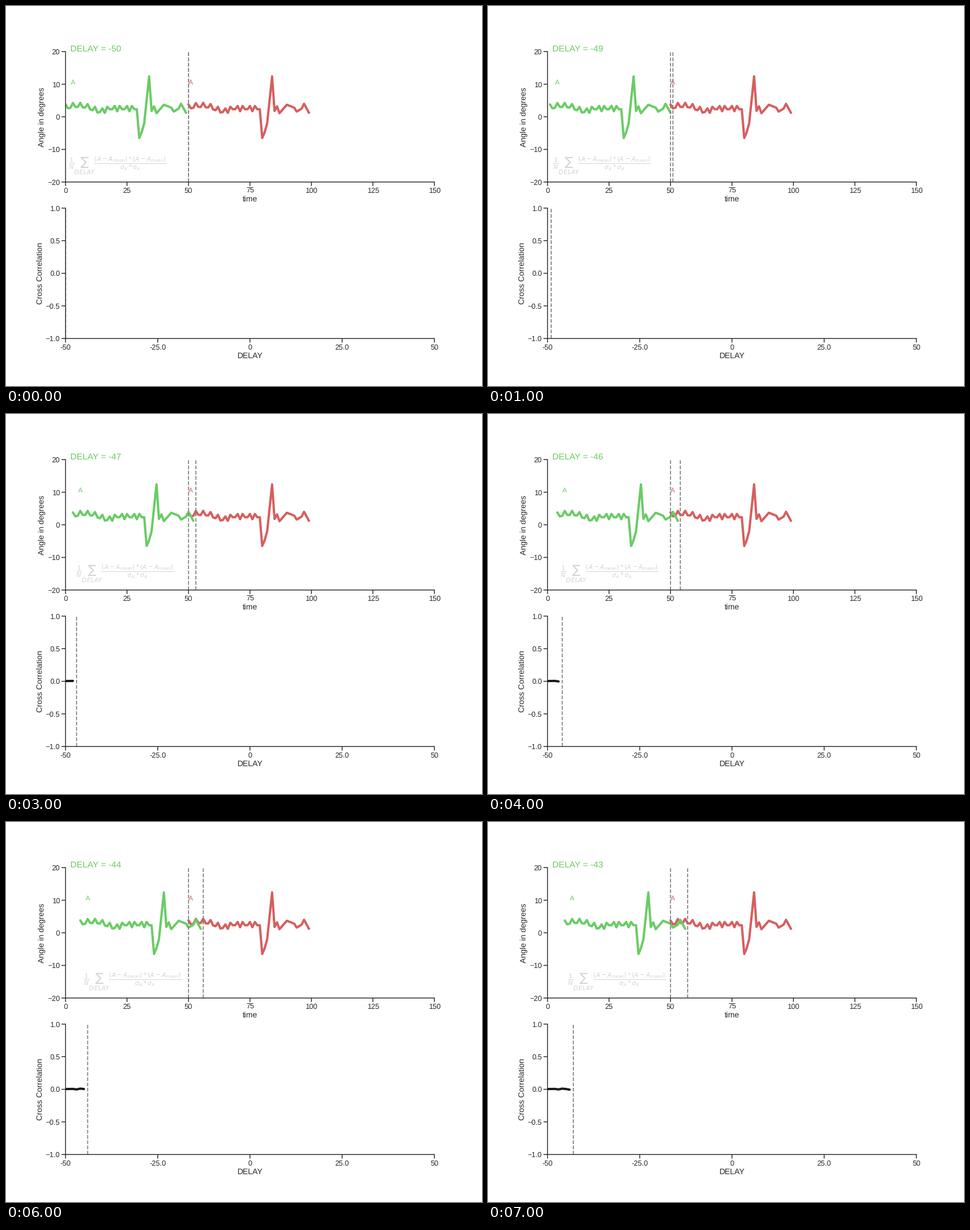
Write a matplotlib script that moves like this. It is 837 px wide and 669 px high and loops after 8000 ms.

```python
import numpy as np
import matplotlib.pyplot as plt
from matplotlib.animation import FuncAnimation

W, H, DPI = 837, 669, 83.7
FRAMES, INTERVAL = 8, 1000
GREEN, RED, INK, BLACK = "#6ACC65", "#D65F5F", "#262626", "#1A1A1A"
SAMPLES = 50
FORMULA = (r"$\frac{1}{N}\sum_{DELAY}"
           r"\frac{(A-A_{mean})*(A-A_{mean})}{\sigma_A*\sigma_A}$")

plt.rcParams.update({
    "font.family": "Liberation Sans",
    "font.size": 12,
    "mathtext.fontset": "dejavusans",
    "text.hinting": "none",
    "text.color": INK,
    "axes.labelcolor": INK,
    "axes.edgecolor": INK,
    "axes.linewidth": 1.25,
    "axes.labelsize": 12,
    "axes.spines.top": False,
    "axes.spines.right": False,
    "lines.solid_capstyle": "round",
})


def angle(t):
    """A drifting ripple, then a sharp dip and spike that settles."""
    cycle = np.interp(t, [0, 12, 14.75, 29.75], [0, 4, 5, 11])
    drift = np.interp(t, [0, 4, 8, 14, 18], [2.9, 3.5, 3.3, 1.6, 2.6])
    ripple = drift + 0.9 * np.cos(2 * np.pi * cycle)
    spike = np.interp(t, [30, 31, 32, 34, 35, 36, 37, 40, 43, 44, 46, 47, 49],
                      [-6.5, -4.7, -2, 12.4, 1.8, 3.2, 1.1, 3.7, 2.8, 1.6,
                       2.5, 4, 1.2])
    return np.where(t < 30, ripple, spike)


def correlation(n):
    """A faint wobble that grows as the two signals start to overlap."""
    return 0.004 + 0.002 * n * np.sin(2.24 * (n - 0.8))


steps = np.arange(SAMPLES)
signal = angle(steps)

# The tiny margin keeps float rounding from losing a pixel
fig = plt.figure(figsize=((W + 1e-6) / DPI, (H + 1e-6) / DPI), dpi=DPI,
                 facecolor="white")
top, low = fig.subplots(2, 1)
fig.subplots_adjust(left=0.125, right=0.9, bottom=0.125, top=0.88, hspace=0.2)


def style(ax, xticks, yticks, xlabel, ylabel):
    ax.set(xlim=(xticks[0], xticks[-1]), ylim=(yticks[0], yticks[-1]),
           xticks=xticks, yticks=yticks, xlabel=xlabel)
    ax.set_ylabel(ylabel, labelpad=2.6)
    ax.xaxis.set_label_coords(0.5, -0.106)
    ax.tick_params(length=0, pad=8.4, labelcolor=INK, labelsize=11)
    for spine in ax.spines.values():
        spine.set_snap(False)
    # Unsnapped tick marks, 7 px long
    look = dict(color=INK, lw=1.25, clip_on=False, snap=False)
    box = ax.get_position()
    ax.vlines(xticks, -7 / (box.height * H), 0,
              transform=ax.get_xaxis_transform(), **look)
    ax.hlines(yticks, -7 / (box.width * W), 0,
              transform=ax.get_yaxis_transform(), **look)


def marker(ax, x):
    return ax.axvline(x, color="gray", ls="--", lw=1.5, snap=False)


style(top, np.linspace(0, 150, 7), np.linspace(-20, 20, 5),
      "time", "Angle in degrees")
style(low, np.linspace(-50, 50, 5), np.linspace(-1, 1, 5),
      "DELAY", "Cross Correlation")
low.set_xticklabels(["-50", "-25.0", "0", "25.0", "50"])

top.plot(steps + SAMPLES, signal, color=RED, lw=3.5)
moving, = top.plot([], [], color=GREEN, lw=3.5)
marker(top, SAMPLES)
edge = marker(top, SAMPLES)
title = top.text(2, 20, "", color=GREEN, fontsize=13.4)
top.text(50.1, 10, "A", color=RED, fontsize=10)
name = top.text(2.1, 10, "A", color=GREEN, fontsize=10)
formula = top.text(1.2, -15, FORMULA, color="lightgray", fontsize=13.2)

trace, = low.plot([], [], color=BLACK, lw=3.5)
cursor = marker(low, -SAMPLES)


def update(k):
    delay = k - SAMPLES
    n = np.arange(k)
    title.set_text(f"DELAY = {delay}")
    moving.set_data(steps + k, signal)
    edge.set_xdata([SAMPLES + k] * 2)
    name.set_x(k + 2.1)
    formula.set_x(k + 1.2)
    trace.set_data(n - SAMPLES, correlation(n))
    cursor.set_xdata([delay] * 2)
    return moving, edge, title, name, formula, trace, cursor


anim = FuncAnimation(fig, update, frames=FRAMES, interval=INTERVAL,
                     init_func=lambda: update(0), repeat=True, blit=False)
plt.show()
```
